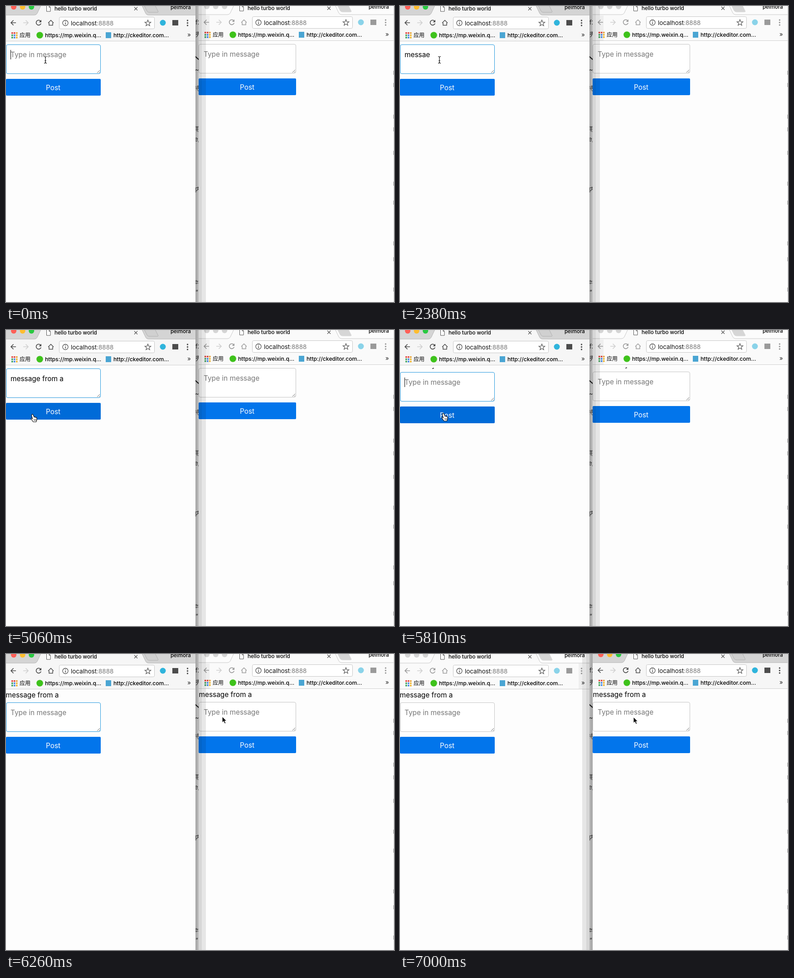
Animation, 856 px wide and 654 px high, one loop 8000 ms. Source, as an HTML page:

```html
<!DOCTYPE html>
<html lang="en">
<head>
<meta charset="utf-8">
<title>hello turbo world</title>
<style>
html, body { margin: 0; width: 100%; height: 100%; overflow: hidden; background: #fdfdfd; }
svg { display: block; font-family: Inter, "Noto Sans CJK SC", "Noto Sans CJK", sans-serif; }
text { white-space: pre; }
.bar { font-weight: 500; }
</style>
</head>
<body>
<svg id="stage" width="856" height="654" viewBox="0 0 856 654"></svg>
<script>
const LOOP = 8000, FONT = 15.4;
const stage = document.getElementById('stage');
const pen = document.createElement('canvas').getContext('2d');

// time, typed text, caret visible
const typing = [
  [0, '', 1], [150, '', 0], [600, '', 1], [900, 'm', 1], [1200, 'me', 1], [1350, 'mes', 1],
  [1490, 'mess', 1], [1640, 'messa', 1], [1930, 'messae', 1], [2380, 'messae', 0],
  [2520, 'messa', 1], [2820, 'message', 1], [3120, 'message ', 1], [3270, 'message f', 1],
  [3570, 'message fro', 1], [3720, 'message from', 1], [4010, 'message from ', 1],
  [4460, 'message from ', 0], [4610, 'message from a', 1], [5060, 'message from a', 0],
  [5660, '', 1], [6110, '', 0]
];
// time, pointer shape, x, y
const pointer = [
  [0, 'beam', 87, 119], [4910, 'beam', 76, 146], [5060, 'hand', 61, 194], [5210, 'hand', 68, 194],
  [5360, 'hand', 84, 193], [5660, 'hand', 98, 192], [5960, 'hand', 120, 190],
  [6110, 'arrow', 330, 165], [6260, 'arrow', 477, 138], [6410, 'arrow', 497, 138],
  [6710, 'arrow', 515, 139]
];
const SWITCH = 6860, POSTED = 5643;
const times = [...new Set([...typing, ...pointer].map(k => k[0]).concat(5810, SWITCH, 7000))]
  .sort((a, b) => a - b);

const last = (keys, t) => keys.filter(k => k[0] <= t).pop();
const rect = (x, y, w, h, fill, more = '') =>
  `<rect x="${x}" y="${y}" width="${w}" height="${h}" fill="${fill}" ${more}/>`;
const dot = (x, y, r, fill) => `<circle cx="${x}" cy="${y}" r="${r}" fill="${fill}"/>`;
const path = (d, fill, stroke = 'none', width = 1) =>
  `<path d="${d}" fill="${fill}" stroke="${stroke}" stroke-width="${width}"/>`;
const line = (d, stroke, width = 1) => path(d, 'none', stroke, width);
const text = (s, x, y, size, fill = '#000', more = '') =>
  `<text x="${x}" y="${y}" font-size="${size}" fill="${fill}" ${more}>${s}</text>`;
const star = (cx, cy) => 'M' + Array.from({ length: 10 }, (_, i) => {
  const r = i % 2 ? 3 : 7, a = (i / 5 - .5) * Math.PI;
  return `${cx + r * Math.cos(a)} ${cy + r * Math.sin(a)}`;
}).join('L') + 'Z';

// Browser frame; extra is the additional width of the right-aligned controls
function chrome(active, extra) {
  const ink = active ? '#4c4c4c' : '#9c9c9c', bar = active ? '#f6f6f6' : '#fafafa';
  const edge = active ? '#b4b4b4' : '#c8c8c8', faded = active ? 1 : .55;
  const lights = active ? ['#ff5f57', '#ffbd2e', '#28c940'] : Array(3).fill('#d5d5d5');
  const apps = ['#e2453c', '#e2453c', '#e8a33a', '#3fa45b', '#4285e8', '#efb52e', '#3fa45b', '#4285e8', '#efb52e'];
  return '<g class="bar">' + rect(-1, -2, 440, 23, active ? '#d4d4d4' : '#fcfcfc')
    + rect(-1, 20, 440, 58, bar)
    + path('M-2 20H63Q67 20 69 16L78-3H299L308 16Q310 20 314 20H440', bar, edge)
    + path('M304-3L311 11Q313 14 316 14H334Q337 14 335 11L328-3Z', active ? '#d0d0d0' : '#d6d6d6', active ? '#b0b0b0' : '#d6d6d6')
    + lights.map((c, i) => dot(17 + i * 19.6, 2, 6, c)).join('')
    + path('M89.5-1H95L98 3V12H89.5ZM95-1V3H98', '#fff', '#555')
    + text('hello turbo world', 107, 10, 11.6)
    + line('M283 2.5L290 9.5M290 2.5L283 9.5', '#555', 1.2)
    + text('pelmora', 363 + extra, 7, 11.5)
    + line('M22 37H11M16.5 31.5L11 37L16.5 42.5', ink, 1.7)
    + line('M38 37H49M43.5 31.5L49 37L43.5 42.5', '#d0d0d0', 1.7)
    + line('M76.5 33.5A5.5 5.5 0 1 0 77.3 38.5', ink, 1.7)
    + path('M78 30.5V36H72.5Z', ink)
    + line('M93 37.5L99 31.5L105 37.5M95 37V42.5H103V37', ink, 1.5)
    + rect(117.5, 24.5, 210 + extra, 26, '#fff', 'rx="3" stroke="#c6c6c6"')
    + '<circle cx="131" cy="37.5" r="6" fill="none" stroke="#555" stroke-width="1.3"/>'
    + line('M131 36.5V41M131 33.5V35', '#555', 1.5)
    + text('localhost<tspan fill="#777">:8888</tspan>', 143, 42.5, 13.4, '#111', 'font-weight="400"')
    + path(star(313 + extra, 38), 'none', '#555', 1.2)
    + `<g opacity="${faded}">` + dot(346 + extra, 37, 6.5, '#2fb4dc')
    + rect(367 + extra, 31, 13, 12, '#4c4c4c') + '</g>'
    + [32, 37.5, 43].map(y => dot(400.5 + extra, y, 1.7, ink)).join('')
    + apps.map((c, i) => rect(12 + i % 3 * 5, 58 + (i / 3 | 0) * 5, 3.5, 3.5, c)).join('')
    + text('应用', 30, 69, 12)
    + dot(74.5, 64.5, 7.3, '#3ec21b')
    + text('https://mp.weixin.q...', 86, 69, 12.2)
    + rect(220, 58, 12, 13, '#4aa5d3')
    + text('http://ckeditor.com...', 237, 69, 12.2)
    + text('»', 400 + extra, 68, 13, '#444')
    + line('M-1 77.5H440', '#cfcfcf') + '</g>';
}

// Page with message list, text box and button; grow is the visible height of the list
function page(id, x, right, grow, { typed = '', caret, focus, hover }) {
  const w = right - x, caretX = Math.round(10 + pen.measureText(typed).width) + .5;
  return `<clipPath id="${id}"><rect x="-2" y="78" width="440" height="${grow}"/></clipPath>`
    + `<g clip-path="url(#${id})">${text('message from a', -.5, 95.5, FONT)}</g>`
    + `<g transform="translate(0 ${grow})">`
    + rect(x + .5, 85.5, w - 1, 64, '#fff', `rx="3.5" stroke="${focus ? '#2598de' : '#c4c4c4'}"`)
    + line(`M${right - 8} 148L${right - 2} 142M${right - 4} 148L${right - 2} 146`, '#666')
    + text(typed || 'Type in message', 10, 113, FONT, typed ? '#000' : '#777')
    + (caret ? line(`M${caretX} 97V118`, '#000') : '')
    + rect(x, 161, w, 37, hover ? '#006bd8' : '#0275eb', 'rx="2"')
    + text('Post', (x + right) / 2 - .5, 185.5, FONT, '#fff', 'text-anchor="middle"')
    + '</g>';
}

// Shadow cast on the inactive window by its neighbour; dir points inward
function shade(x, dir) {
  const band = (from, to, y, h, a) =>
    rect(dir > 0 ? x + from : x - to, y, to - from, h, '#000', `opacity="${a}"`);
  return band(0, 7, 0, 654, .15) + band(7, 16, 0, 654, .09) + band(16, 24, 21, 56, .045);
}

function backdrop(leftActive) {
  const bits = [['f2', 418, 41], ['秀', 418, 67], ['~', 417, 145], ['持', 415, 186],
    ['用', 415, 276], ['e;', 416, 299], ['内', 417, 410], ['es', 416, 614], ['“', 418, 637]];
  const [a, b] = leftActive ? ['#a2a2a2', '#bdbdbd'] : ['#b9b9b9', '#a4a4a4'];
  return `<linearGradient id="gap"><stop stop-color="${a}"/><stop offset="1" stop-color="${b}"/></linearGradient>`
    + rect(418, 0, 7, 654, 'url(#gap)')
    + `<g clip-path="url(#slit)">${bits.map(([s, x, y]) => text(s, x, y, 13, '#222')).join('')}`
    + line('M417 111L426 119', '#111', 2) + '</g>'
    + rect(855, 0, 1, 654, '#e2e2e2')
    + [143, 170, 240, 268, 320, 388, 430, 520, 555, 622].map(y => rect(855, y, 1, 9, '#777')).join('');
}

const beam = 'M-3-7.5Q0-7.5 0-5V5Q0 7.5-3 7.5M3-7.5Q0-7.5 0-5M0 5Q0 7.5 3 7.5M-2 2H2';
const shapes = {
  beam: line(beam, '#fff', 2.6) + line(beam, '#111', 1.2),
  hand: path('M-4-7Q-2.5-9-1-6.5L1-1.5Q2.5-3 3.5-1Q5-2 5.5-.5Q7-1 7 2V5L5.5 9H-1L-5.5 2.5Q-6 .5-4 .8L-2.5 2L-4.5-4.5Q-5-6-4-7Z', '#fff', '#111', 1.2)
    + line('M1 3V6.5M3 3V6.5M5 3V6.5', '#111', .8),
  arrow: path('M0 0V14L3.2 11L5.5 16L8 15L5.8 10H10Z', '#000', '#fff', 1.1)
};

function scene(t) {
  const [, typed, blink] = last(typing, t), [, shape, x, y] = last(pointer, t);
  const leftActive = t < SWITCH;
  const p = Math.min(1, Math.max(0, (t - POSTED) / 400));
  const grow = Math.round(22 * (.5 - Math.cos(p * Math.PI) / 2));
  const left = { typed, caret: leftActive && blink, focus: leftActive, hover: shape === 'hand' };
  return '<clipPath id="slit"><rect x="418" y="0" width="7" height="654"/></clipPath>'
    + '<clipPath id="west"><rect width="418" height="654"/></clipPath>'
    + '<clipPath id="east"><rect x="425" width="430" height="654"/></clipPath>'
    + rect(0, 0, 856, 654, '#fdfdfd')
    + backdrop(leftActive)
    + `<g clip-path="url(#west)">${chrome(leftActive, 0)}${page('listA', 0, 209, grow, left)}`
    + (leftActive ? '' : shade(418, -1)) + '</g>'
    + `<g clip-path="url(#east)"><g transform="translate(426 -1)">${chrome(!leftActive, 11)}${page('listB', -1, 214, grow, {})}</g>`
    + (leftActive ? shade(425, 1) : '') + '</g>'
    + `<g transform="translate(${x} ${y})">${shapes[shape]}</g>`;
}

let shown = -1;
function tick() {
  const now = performance.now() % LOOP;
  const step = times.filter(t => t <= now).pop();
  if (step !== shown) {
    pen.font = FONT + 'px Inter, sans-serif';
    stage.innerHTML = scene(shown = step);
  }
  requestAnimationFrame(tick);
}
tick();
</script>
</body>
</html>
```
